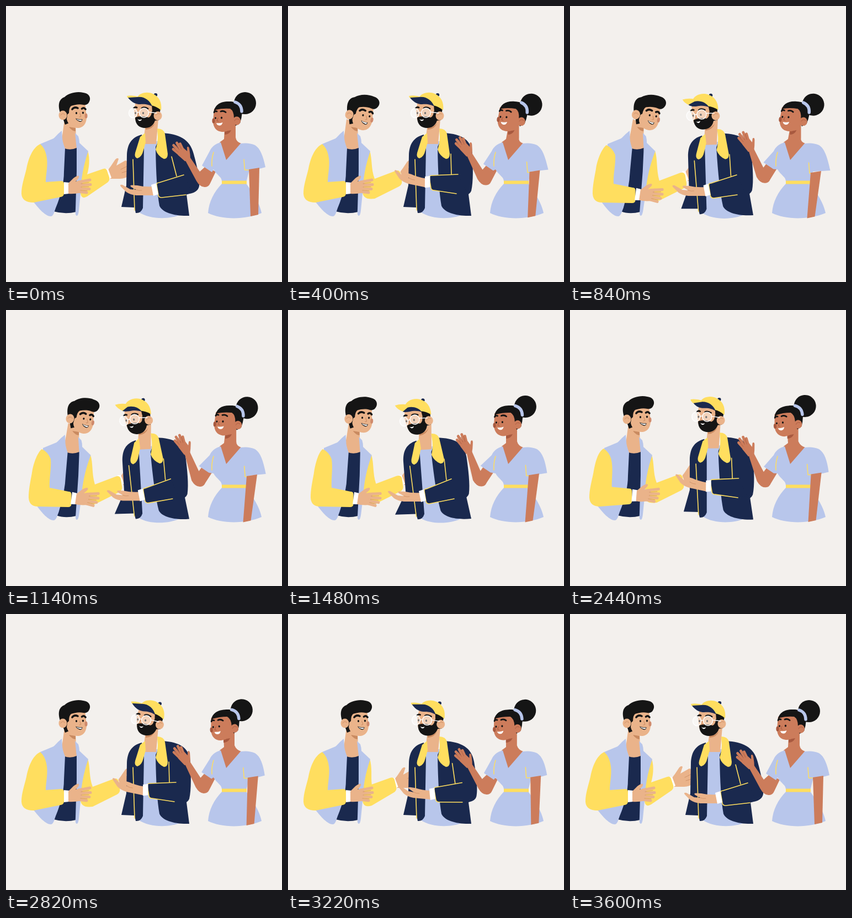
An HTML page with a canvas that plays this animation: 500x500 px, repeating every 3640 ms.

```html
<!DOCTYPE html>
<html lang="en">
<head>
<meta charset="utf-8">
<title>Three people talking</title>
<style>
html, body { margin: 0; height: 100%; overflow: hidden; background: #f3f0ed; }
canvas { display: block; width: 100vw; height: 100vh; object-fit: contain; }
</style>
</head>
<body>
<canvas id="stage" width="500" height="500"></canvas>
<script>
const ctx = document.getElementById('stage').getContext('2d');
const BG = '#f3f0ed', YELLOW = '#ffde5f', BLUE = '#b8c6eb', NAVY = '#1a294e', BLACK = '#151515',
  SKIN = '#eab38a', SHADE = '#c98a60', BROWN = '#cc7c5b', BROWN_SHADE = '#a8593f', WHITE = '#fff';
const LOOP = 3640;
const TIMES = [0, 400, 840, 1480, 2100, 2820, 3600];

// A few drivers per person, one value per key time; every joint follows from them.
const DRIVERS = {
  lean1: [0, 0, 6, 3, 0, 0],
  nod1: [0, 12, 12, 4, 0, 0],
  offer1: [0, 0, 1, 1, 1, 0],
  reach: [0, 1, 1, 1, 1, 1],
  lean2: [0, 0, .5, 1, .5, 0],
  nod2: [0, 0, -4.6, -5, -1.5, 6.5],
  raise2: [0, 1, 0, 0, 1, 1],
  nod3: [0, 5, 5, -2, -5, -4],
  wave3: [0, .4, .8, .95, 1, .35],
  swing3: [0, .65, 1, 1, 1, .55]
};

// Smooth cyclic interpolation that never overshoots a key.
function sample(values, t) {
  t = Math.min(t, TIMES[6]);
  const n = 6, i = Math.min(5, TIMES.findIndex((_, k) => t <= TIMES[k + 1]));
  const at = k => values[(k + n) % n];
  const span = k => TIMES[(k + n) % n + 1] - TIMES[(k + n) % n];
  const slope = k => (at(k + 1) - at(k)) / span(k);
  const tangent = k => {
    const a = slope(k - 1), b = slope(k);
    return a * b > 0 ? 2 * a * b / (a + b) : 0;
  };
  const h = span(i), u = (t - TIMES[i]) / h, v = 1 - u;
  return at(i) * v * v * (1 + 2 * u) + at(i + 1) * u * u * (3 - 2 * u)
    + h * u * v * (tangent(i) * v - tangent(i + 1) * u);
}

const mix = (a, b, u) => a + (b - a) * u;

function fill(color, d) {
  ctx.fillStyle = color;
  ctx.fill(new Path2D(d));
}

function line(color, width, d) {
  ctx.strokeStyle = color;
  ctx.lineWidth = width;
  ctx.stroke(new Path2D(d));
}

function oval(color, x, y, rx, ry = rx) {
  ctx.fillStyle = color;
  ctx.beginPath();
  ctx.ellipse(x, y, rx, ry, 0, 0, 7);
  ctx.fill();
}

// Draws moved by (dx, dy), turned about (x, y) and leaning sideways by `skew` per pixel of height.
function group(dx, dy, degrees, x, y, draw, skew = 0) {
  ctx.save();
  ctx.translate(x + dx, y + dy);
  ctx.transform(1, 0, -skew, 1, 0, 0);
  ctx.rotate(degrees * Math.PI / 180);
  ctx.translate(-x, -y);
  draw();
  ctx.restore();
}

function farArm1({ lean1: k, reach: r }) {
  const p = (x0, y0, x1, y1) => `${mix(x0, x1, r) + k * .8} ${mix(y0, y1, r) + k * .6} `;
  group(mix(186, 204, r) + k, mix(304, 308, r), 0, 0, 0, () => {
    fill(SKIN, 'M-2 -6 L4 -14 L12 -26 Q16 -30 18 -27 L14 -15 L30 -24 Q34 -24 33 -21 L37 -14 V2 Q32 9 20 9 L2 9Z');
    line(SHADE, .8, 'M22 -8 L36 -15 M24 -2 L37 -6');
    fill(WHITE, 'M-7 -9 L-1 -9 L5 7 L-1 11Z');
  });
  fill(YELLOW, `M${148 + k} 262 C${153 + k} 278 ${150 + k} 295 ${p(147, 305, 157, 313)}
    L${p(176, 295, 194, 299)} Q${p(181, 293, 202, 296)} ${p(183, 298, 204, 303)}
    L${p(187, 310, 206, 316)} Q${p(189, 317, 208, 323)} ${p(182, 321, 201, 327)}
    L${p(147, 345, 157, 349)} Q135 352 135 336 L138 270Z`);
}

function torso1({ lean1: k }) {
  group(0, 0, 0, 0, 381, () => {
    fill(SKIN, 'M106 205 L103 228 L101 240 L107 262 H129 L127 240 L126 214Z');
    fill(SHADE, 'M114 219 L126 221 L126 227 Q119 226 114 219Z');
    fill(NAVY, `M106 258 Q117 262 128 257 L134 330 L127 373 Q107 378 ${86 + k} 372Z`);
    fill(BLUE, `M101 226 C94 231 90 237 86 240 L62 250 L64 320 L${50 + k} 355 C${60 + k} 368 ${72 + k} 381 ${81 + k} 381
      C${86 + k} 381 ${87 + k} 374 ${90 + k} 366 Q105 330 105 300 L107 258 Q102 246 102 238Z`);
    fill(BLUE, 'M125 230 L131 236 Q133 242 133 248 L149 263 C140 290 136 312 135 340 L132 370 Q131 380 128 380 Q125 380 126 368 L128 300 L128 258Z');
  }, k / 131);
}

function nearArm1({ lean1: k, offer1: s }) {
  const x = 105 + 13.5 * s, y = 331 + 12 * s;
  const shoulder = `${62 - 2 * s + k} ${250 + 2 * s}`;
  fill(YELLOW, `M${shoulder} C${48 + 5 * s + k} 257 ${41 + 9 * s} 275 ${37 + 10 * s} 295
    C${33 + 11 * s} 312 ${28 + 13 * s} 325 ${28 + 13 * s} 340 Q${29 + 13 * s} 356 ${50 + 8 * s} 356
    L${x - 6} ${y + 15 - s} Q${x} ${y + 14} ${x} ${y + 8} L${x} ${y - 9} Q${x} ${y - 14} ${x - 5} ${y - 14}
    L${72 + 7 * s} ${319 + 3 * s} C${72 + 6 * s} 305 ${77 + 3 * s + k / 2} 287 ${73 + 3 * s + k} 270 Q${70 + s + k} 257 ${shoulder}Z`);
  group(x + 9, y - 1, 8 * s, 0, 0, () => {
    fill(WHITE, 'M-9 -11 L1 -10 L0 10 L-9 11Z');
    fill(SKIN, 'M-1 -9 L8 -18 Q16 -24 18 -22 Q20 -20 12 -12 L25 -15 L22 8 Q10 11 -1 10Z');
    line(SKIN, 5, 'M18 -11 L38 -15 M20 -5 L39 -6.5 M18 1 L37 1.5 M16 6 L32 8');
    line(SHADE, .7, 'M22 -8 L36 -10.5 M22 -2 L36 -2.5 M21 4 L33 4.8');
  });
}

function headOne({ lean1: k, nod1: turn }) {
  group(1.4 * k, 0, turn, 113, 236, () => {
    fill(BLACK, 'M100 186 L104 206 L107 215 L114 212 L118 180Z');
    fill(SKIN, 'M114 174 L143 172 L146 203 C145 214 140 220 131 221 C121 221 112 215 110 205Z');
    oval('#cf8a6c', 145, 199, 2.5, 4.5);
    fill(BLACK, `M98 193 C94 180 95 169 106 165 C113 158 128 154 140 157 C150 158 153 165 152 170
      C150 178 145 180 140 179 C132 177 124 179 118 181 Q114 184 114 194 L109 198Z`);
    oval(SKIN, 103, 198, 7.5, 8.5);
    line(SHADE, .8, 'M99 198 Q102 192 107 197');
    line(BLACK, 3.6, 'M120 187 Q124 182 130 185 M137.5 186 Q141 183 144 187');
    oval(BLACK, 127.5, 194, 1.6, 1.9);
    oval(BLACK, 139.5, 193.5, 1.6, 1.9);
    line(SHADE, 1, 'M133.5 194 L136 200 L133 201');
    fill(BLACK, 'M126 203.5 Q132 206 138.500 205 Q138 210.500 133.500 209.500 Q128 208 126 203.5Z');
    fill(WHITE, 'M127 204.500 Q132 206.500 138 206 L136 208.500 Q130 208 127 204.500Z');
  });
}

// The more he leans, the more of the brim's top shows.
function headTwo({ lean2: b, nod2: turn }) {
  const v = b * (2 - b);
  group(0, 0, turn, 262, 230, () => {
    fill(BLACK, 'M262 178 L280 184 L277 207 L266 208Z');
    fill(SKIN, 'M235 172 L264 178 L266 205 L245 215 L234 206 L232 190Z');
    fill(BLACK, 'M234 202 C234 215 242 221 252 221 C264 221 271 212 271 200 L268 190 L264 191 Q264 200 258 202 C250 199 241 199 234 202Z');
    fill(WHITE, 'M238 205 Q242 207 246 205 Q245 209 241 208Z');
    oval(SKIN, 275, 199, 7.5, 8);
    line(SHADE, .8, 'M271 198 Q275 193 279 196');
    oval(NAVY, 271, 161, 3.2, 3);
    fill(YELLOW, 'M236 169 C239 157 256 154 266 159 C277 164 283 174 281 189 Q273 182 263 180 L240 174Z');
    fill(YELLOW, `M219 163 Q230 161 242 165 L${240 + 4 * v} ${166 + 5 * v} L${222 + 11 * v} ${167 + 10 * v} Q${220 + 2 * v} ${167 + 4 * v} 219 163Z`);
    fill(NAVY, `M${221 + 10 * v} ${166 + 10 * v} C${229 + 4 * v} ${176 + v} 236 178 243 178 C253 177 259 179 265 182
      C261 ${171 + 2 * v} 250 ${163 + 6 * v} ${238 + 3 * v} ${165 + 5 * v}Z`);
    line(BLACK, 2.8, 'M231 185.500 Q234 182 237 184 M246 185 Q250 182 257 186');
    oval(BLACK, 234.5, 194, 1.5, 2);
    oval(BLACK, 248.5, 194, 1.7, 2);
    line(SHADE, 1, 'M240 192 L238.500 199 L242 200');
    oval('rgba(255,255,255,.42)', 230, 194, 7.5, 8.5);
    oval('rgba(255,255,255,.42)', 250, 193.5, 8.5);
    line(WHITE, 1.4, `M237.500 194 A7.500 8.500 0 1 1 222.500 194 A7.500 8.500 0 1 1 237.500 194 Q239.500 191 241.500 193.500
      A8.500 8.500 0 1 1 258.500 193.500 A8.500 8.500 0 1 1 241.500 193.500 M258.500 192 L273 194`);
  });
}

function torso2(pose) {
  const { lean2: b, reach: r } = pose;
  const p = (x0, y0, x1, y1) => `${mix(x0, x1, r)} ${mix(y0, y1, r)} `;
  group(0, -2 * b, -3.7 * b, 332, 380, () => {
    fill(BLUE, 'M247 245 H276 L286 360 L316 378 C296 387 260 387 240 373 L246 360Z');
    fill(SKIN, 'M253 212 L250 236 L252 250 H272 L276 205Z');
    fill(SHADE, 'M253 218 Q262 222 270 212 Q266 223 253 224Z');
    fill(NAVY, `M246 233 C227 238 220 250 219 270 L218 325 L${209 - 14 * b} 364 L233 365 L235 375 Q244 376 248 366 L250 258Z`);
    fill(NAVY, `M283 230 C${p(312, 232, 316, 232)} ${p(333, 240, 332, 243)} ${p(340, 268, 334, 268)}
      C${p(346, 290, 335, 290)} ${p(352, 315, 336, 318)} ${p(350, 326, 332, 335)}
      Q${p(348, 339, 331, 338)} 327 341 L332 380 C305 381 283 374 278 362 Q272 330 271 255Z`);
    line(YELLOW, 1.6, 'M230 278 L233 370');
    fill(YELLOW, 'M252 230 L243 237 L234 266 Q232 274 238 276 Q246 274 249 261 L253 247Z');
    fill(YELLOW, 'M274 222 Q286 222 288 232 L293 268 Q293 277 286 277 Q275 272 271 260 Q275 248 275 236Z');
    headTwo(pose);
  }, -.03 * b);
}

function forearm2({ lean2: b, reach: r, raise2: up }) {
  const x = 274 - 17 * r - 9 * b, y = 333 - 13 * up + 4 * b * b;
  const topX = 322 - 14 * r - 12 * b, bottomX = 326 - 21 * r - 4 * b, bottomY = 342 - 2 * up;
  const edge = `M${topX} ${306 - up} L${x + 3} ${y - 13} Q${x - 2} ${y - 13} ${x - 1} ${y - 8}
    L${x + 2} ${y + 10} Q${x + 3} ${y + 14} ${x + 8} ${y + 14} L${bottomX} ${bottomY}`;
  fill(NAVY, edge + `L${topX + 15} ${bottomY - 4}Z`);
  line(YELLOW, 1.6, edge);
  line(YELLOW, 1.6, `M${300 - 5 * r - 12 * b} ${273 - 5 * r + 2 * b} L${309 - 13 * r - 9 * b} ${308 - 3 * up}`);
  group(x, y, 12 * up, 0, 0, () => {
    fill(SKIN, `M-8 -6 Q-24 -5 -36 -8 L-46 -8.500 Q-51 -8 -47 -5 L-38 0 L-49 -1 L-63 -9 Q-69 -10 -66 -6
      L-56 4 Q-49 9 -38 10 L-6 10Z`);
    line(SHADE, .7, 'M-38 0 Q-33 2 -28 1');
    fill(WHITE, 'M-11 -9 L-2 -12 L2 8 L-7 11Z');
  });
}

function raisedArm3({ wave3: w }) {
  const x = 330 - w, y = 278 - 20 * w;
  const ex = 361 - 11 * w * w, ey = 328 - 9 * w;
  const sx = 368 - 8 * w * w, sy = 295 - 7 * w;
  fill(BROWN, `M${x - 5} ${y + 2} L${ex - 16} ${ey - 11} Q${ex - 9} ${ey + 1} ${ex} ${ey} Q${ex + 6} ${ey} ${ex + 9} ${ey - 7}
    L${sx + 12} ${sy + 5} L${sx - 7} ${sy - 4} L${ex - 10 + 8 * w} ${ey - 28} L${x + 4} ${y - 3}Z`);
  group(x, y, 12 * w - 3, 0, 0, () => {
    fill(BROWN, 'M-6 3 L-18 -9 L-19 -16 L-7 -21 L-1 -15 L-1 -22 Q2 -25 3 -20 L4 -9 L4 0Z');
    line(BROWN, 4.8, 'M-15 -10 L-26 -20 M-14 -14 L-25 -27 M-11 -16 L-19 -31 M-8 -17 L-13 -29');
    line(BROWN_SHADE, .7, 'M-17 -14 L-23 -20 M-15 -18 L-20 -26 M-11 -19 L-15 -28');
  });
}

function torso3({ nod3: turn, wave3: w, swing3: g }) {
  const dx = turn / 2, rx = 470 + .3 * turn, ry = 292 + 4 * g + .4 * turn;
  const lx = 355 - 7 * w * w, ly = 289 - 7 * w;
  const hx = 450 - 13.5 * g, hy = 380 + 3.5 * g, ax = 450 - 4 * g;
  fill(BROWN, `M${396 + dx} 222 L395 241 L387 247 L398 282 L426 249 Q417 246 ${416 + dx} 238 L${416 + dx} 210Z`);
  fill(BROWN_SHADE, `M${396 + dx} 227 L${408 + dx} 225 Q${404 + dx} 233 ${396 + dx} 233Z`);
  fill(BLUE, `M389 247 C378 250 372 256 369 263 L${lx} ${ly} L${lx + 18} ${ly + 12} L376 296
    C383 308 391 309 391 318 V322 C376 338 368 354 366 375 C390 387 432 388 463 375 C459 356 448 340 436 323 V316
    L440 300 L${rx} ${ry} C466 273 461 258 451 252 Q440 247 425 249 L399 279Z`);
  fill(YELLOW, 'M391 316.500 H436 V322.500 H391Z');
  line(YELLOW, 1.5, `M376 265 Q372 278 373 290 M${rx - 39} ${ry - 14} L${rx - 37.5} ${ry + 5} H${rx - 31}`);
  fill(BROWN, `M${ax - 10} ${ry + 4} L${ax + 9} ${ry + 1} L${hx + 7} ${hy - 2} L${hx - 7} ${hy + 1}Z`);
}

function headThree({ nod3: turn }) {
  group(turn / 2, 0, turn, 405, 235, () => {
    oval(BLACK, 433, 176, 20);
    fill(BLACK, 'M405 176 L426 180 Q430 194 424 212 L416 217 L408 200Z');
    fill(BROWN, 'M377 186 L409 180 L417 208 C415 220 404 228 391 228 C381 227 375 220 375 208Z');
    oval(BROWN_SHADE, 376, 208, 2.6, 4.5);
    fill(BLACK, 'M376 195 C377 180 387 173 403 173 C420 172 429 182 427 198 L413 203 Q413 190 406 186 Q392 185 380 188Z');
    oval(BROWN, 418, 208, 7, 7.8);
    line(BROWN_SHADE, .8, 'M414 208 Q417 202 422 206');
    line(BLUE, 5.5, 'M415 174 Q427 178 427 191');
    line(BLACK, 2.8, 'M377 192.500 Q379 189.500 382 191 M389 191 Q394 189 398 192.500');
    oval(BLACK, 379.5, 203, 1.5, 1.8);
    oval(BLACK, 390.5, 202.5, 1.6, 1.9);
    line(BROWN_SHADE, 1, 'M384 203 L382 208 L385 209');
    fill(WHITE, 'M381 212 Q387 213 392.500 211 Q391 217 386 216.500 Q382 216 381 212Z');
  });
}

const LAYERS = [farArm1, torso1, headOne, nearArm1, torso2, forearm2, raisedArm3, torso3, headThree];

function frame(now) {
  const pose = {};
  for (const name in DRIVERS) pose[name] = sample(DRIVERS[name], now % LOOP);
  ctx.lineCap = ctx.lineJoin = 'round';
  ctx.fillStyle = BG;
  ctx.fillRect(0, 0, 500, 500);
  LAYERS.forEach(draw => draw(pose));
}

const start = performance.now();
(function tick() {
  frame(performance.now() - start);
  requestAnimationFrame(tick);
})();
</script>
</body>
</html>
```
